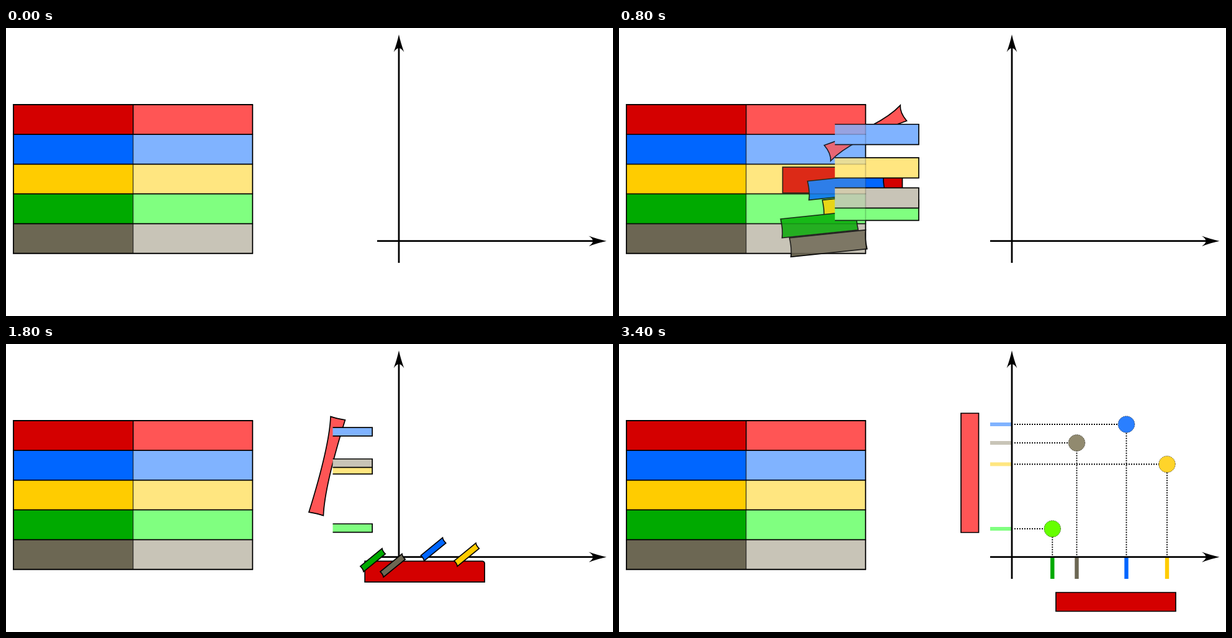
Write an HTML page with a canvas that moves like this. It is 978x466 px and loops after 4400 ms.

```html
<!DOCTYPE html>
<html lang="en">
<head>
<meta charset="utf-8">
<title>Table to scatter plot</title>
<style>
  html, body { margin: 0; width: 100%; height: 100%; overflow: hidden; background: #fff; }
  canvas { display: block; }
</style>
</head>
<body>
<canvas id="stage" width="978" height="466"></canvas>
<script>
const ctx = document.getElementById('stage').getContext('2d');
const LOOP = 4400, STEP = 200, FLY = 2200, GROW = 1000, DOTS = 3400;
const LEFT = 12, MID = 204.8, RIGHT = 397.3, TOP = 124, ROW = 48.15;
const OX = 633, OY = 344.7, LINE = 1.7;
const RED = { dark: '#d40000', light: '#ff5555' };

// table row, plot position and colours of each data point
const points = [
  { row: 1, x: 817.5, y: 130, dark: '#0066ff', light: '#80b3ff', dot: '#2a7fff' },
  { row: 2, x: 883, y: 194.5, dark: '#ffcc00', light: '#ffe680', dot: '#ffd42a' },
  { row: 3, x: 698.3, y: 299, dark: '#00aa00', light: '#80ff80', dot: '#66ff00' },
  { row: 4, x: 737.5, y: 160, dark: '#6c6753', light: '#c8c4b7', dot: '#918a6f' }
];
const rows = [RED, ...points];

const mix = (a, b, p) => a + (b - a) * p;
const mixPt = (a, b, p) => [mix(a[0], b[0], p), mix(a[1], b[1], p)];
const rowY = r => TOP + r * ROW;
// corners in the order top left, top right, bottom right, bottom left
const box = (x0, y0, x1, y1) => [[x0, y0], [x1, y0], [x1, y1], [x0, y1]];
const darkCell = r => box(LEFT, rowY(r), MID, rowY(r + 1));
const lightCell = r => box(MID, rowY(r), RIGHT, rowY(r + 1));
// a box turned a quarter to the left
const turned = (x0, y0, x1, y1) => [[x0, y1], [x0, y0], [x1, y0], [x1, y1]];
const morph = (from, to, p) => from.map((c, i) => mixPt(c, to[i], p));

function paint(fill, stroke = true) {
  ctx.fillStyle = fill;
  ctx.fill();
  if (!stroke) return;
  ctx.strokeStyle = '#000';
  ctx.lineWidth = LINE;
  ctx.stroke();
}

function poly(pts) {
  ctx.beginPath();
  pts.forEach(c => ctx.lineTo(...c));
  ctx.closePath();
}

function line(x0, y0, x1, y1, width) {
  ctx.beginPath();
  ctx.moveTo(x0, y0);
  ctx.lineTo(x1, y1);
  ctx.strokeStyle = '#000';
  ctx.lineWidth = width;
  ctx.stroke();
}

// curve to b, with its control point at share k of the chord, moved to the right of travel
function bend(a, b, k, amount) {
  const dx = b[0] - a[0], dy = b[1] - a[1], len = Math.hypot(dx, dy) || 1;
  const c = mixPt(a, b, k);
  ctx.quadraticCurveTo(c[0] - dy / len * amount, c[1] + dx / len * amount, ...b);
}

function bentQuad([a, b, c, d], side, end) {
  ctx.beginPath();
  ctx.moveTo(...a);
  bend(a, b, 0.7, side);
  bend(b, c, 0.4, end);
  bend(c, d, 0.7, side);
  bend(d, a, 0.4, end);
  ctx.closePath();
}

function table() {
  rows.forEach((r, i) => {
    const y = rowY(i), h = ROW;
    ctx.fillStyle = r.dark;
    ctx.fillRect(LEFT, y, MID - LEFT, h);
    ctx.fillStyle = r.light;
    ctx.fillRect(MID, y, RIGHT - MID, h);
  });
  for (let i = 0; i <= rows.length; i++) line(LEFT - 1, rowY(i), RIGHT + 0.8, rowY(i), 1.8);
  line(LEFT, TOP, LEFT, rowY(5), 1.8);
  line(RIGHT, TOP, RIGHT, rowY(5), 1.8);
  line(MID, TOP, MID, rowY(1), 1.6);
  line(MID, rowY(1), MID, rowY(5), 1);
}

function arrow(x, y, angle) {
  ctx.save();
  ctx.translate(x, y);
  ctx.rotate(angle);
  ctx.beginPath();
  ctx.moveTo(0, 0);
  ctx.quadraticCurveTo(-12, -2.5, -28.5, -8.3);
  ctx.quadraticCurveTo(-22, -4, -22, 0);
  ctx.quadraticCurveTo(-22, 4, -28.5, 8.3);
  ctx.quadraticCurveTo(-12, 2.5, 0, 0);
  paint('#000', false);
  ctx.restore();
}

function axes() {
  line(598, OY, 948, OY, 2.8);
  line(OX, 380, OX, 30, 2.8);
  arrow(967.5, OY, 0);
  arrow(OX, 10.5, -Math.PI / 2);
}

function darkTitle(p, s) {
  const [a, b, c, d] = morph(darkCell(0), box(704, 402, 897, 432.5), p);
  const r = 7 * s;
  ctx.beginPath();
  ctx.moveTo(...a);
  ctx.lineTo(b[0] - r, b[1]);
  ctx.quadraticCurveTo(b[0] - 1, b[1], b[0], b[1] + r * 0.8);
  ctx.lineTo(...c);
  ctx.lineTo(...d);
  ctx.closePath();
  paint(RED.dark);
}

function lightTitle(p, s) {
  const q = morph(lightCell(0), turned(551, 112, 579.5, 305), p);
  q[1][1] += 6 * s;
  q[3][1] -= 6 * s;
  bentQuad(q, 16 * s, 9 * s * (1 - p));
  paint(RED.light);
}

function pieces(p) {
  const s = Math.sin(Math.PI * p), landed = p >= 1;
  darkTitle(p, s);
  for (const d of points) {
    bentQuad(morph(darkCell(d.row), turned(d.x - 3.2, OY, d.x + 3.2, 380), p), 0, 3 * s);
    paint(d.dark, !landed);
  }
  lightTitle(p, s);
  for (const d of points) {
    const q = morph(lightCell(d.row), box(598, d.y - 3, OX, d.y + 3), p);
    poly(q);
    paint(d.light, false);
    if (landed) continue;
    ctx.beginPath();
    q.forEach(c => ctx.lineTo(...c));
    ctx.strokeStyle = '#000';
    ctx.lineWidth = LINE;
    ctx.stroke();
  }
}

function guides(g) {
  ctx.setLineDash([2, 2]);
  for (const d of points) {
    line(OX + 4, d.y, mix(OX + 6, d.x, g), d.y, 1.8);
    line(d.x, OY - 3, d.x, mix(OY - 9, d.y, g), 1.8);
  }
  ctx.setLineDash([]);
}

function dots() {
  for (const d of points) {
    ctx.beginPath();
    ctx.arc(d.x, d.y, 13.3, 0, 2 * Math.PI);
    paint(d.dot, false);
    ctx.strokeStyle = '#000';
    ctx.lineWidth = 0.7;
    ctx.setLineDash([1.5, 1.5]);
    ctx.stroke();
    ctx.setLineDash([]);
  }
}

function draw(time) {
  const t = Math.min(DOTS, Math.floor((time % LOOP) / STEP) * STEP);
  const p = Math.min(1, t / FLY);
  ctx.fillStyle = '#fff';
  ctx.fillRect(0, 0, 978, 466);
  table();
  if (p < 1) axes();
  if (p > 0) pieces(p);
  // the table shines faintly through the pieces that still cover it
  if (p > 0 && p < 0.6) {
    ctx.globalAlpha = 0.18;
    table();
    ctx.globalAlpha = 1;
  }
  if (p === 1) {
    axes();
    guides(Math.min(1, (t - FLY) / GROW));
  }
  if (t >= DOTS) dots();
}

const start = performance.now();
function tick() {
  draw(performance.now() - start);
  requestAnimationFrame(tick);
}
tick();
</script>
</body>
</html>
```
